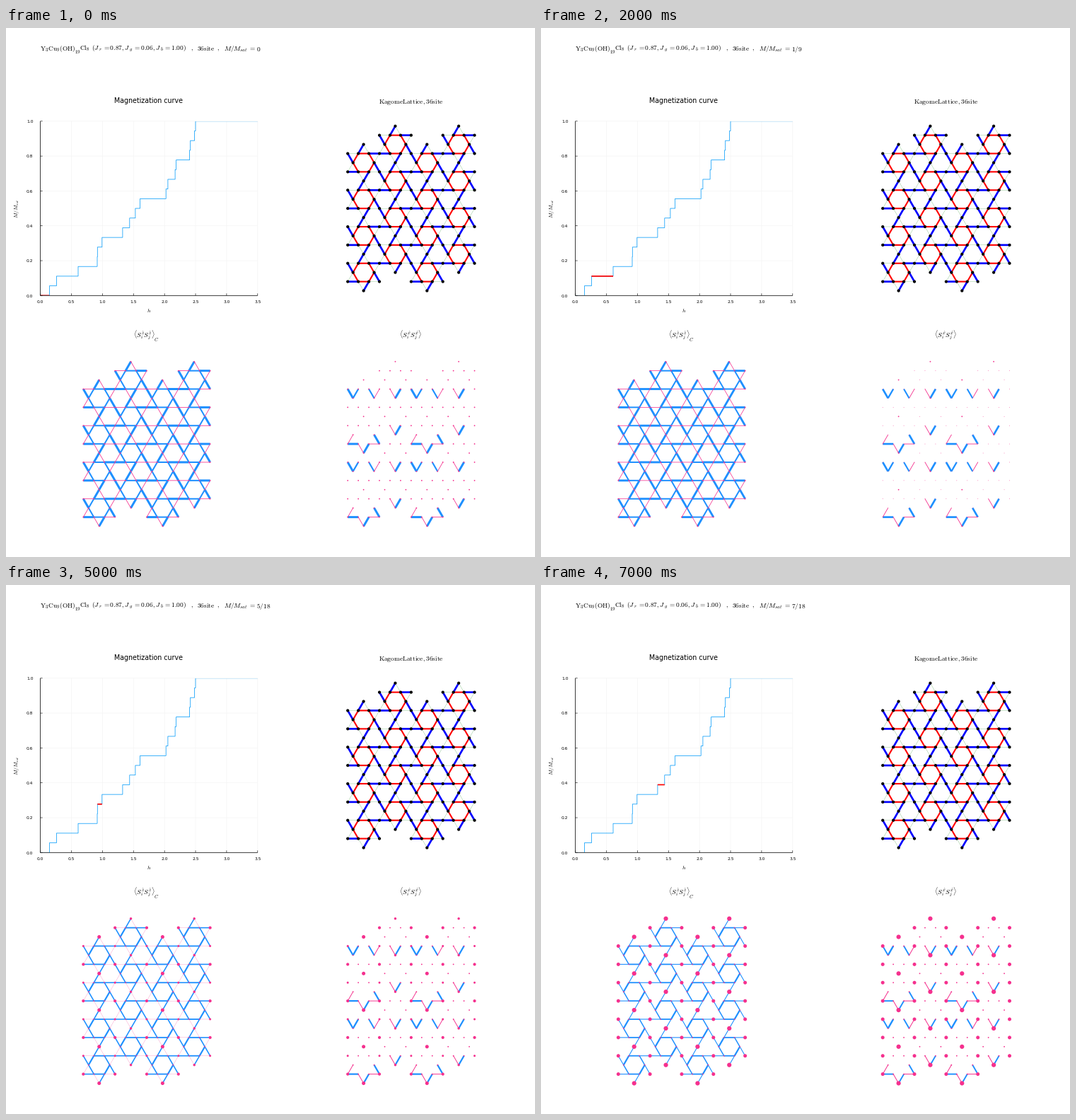
A matplotlib script for the animation above (8 s loop, 748 by 748 pixels).

```python
import math

import matplotlib.pyplot as plt
import numpy as np
from matplotlib.animation import FuncAnimation
from matplotlib.collections import LineCollection
from matplotlib.patches import Rectangle

SIZE, DPI, STATES = 748, 64, 8
PT = 72 / DPI  # points per pixel
BLUE, PINK = "#1e90ff", "#f5308e"

plt.rcParams["mathtext.fontset"] = "cm"
plt.rcParams["font.family"] = "DejaVu Sans"

fig = plt.figure(figsize=(SIZE / DPI, SIZE / DPI), dpi=DPI, facecolor="white")
ax = fig.add_axes([0, 0, 1, 1])
ax.set(xlim=(0, SIZE), ylim=(SIZE, 0))
ax.axis("off")


def label(x, y, s, px=9.4, ha="left", va="baseline", **kw):
    return ax.text(x, y, s, fontsize=px * PT, ha=ha, va=va, **kw)


def line(xs, ys, color, px, **kw):
    return ax.plot(xs, ys, color=color, lw=px * PT, snap=False,
                   solid_capstyle="butt", solid_joinstyle="miter", **kw)[0]


# --- heading -------------------------------------------------------------
for x, part in [(48.5, r"\mathrm{Y_3Cu_9(OH)}"), (104.5, r"\mathrm{Cl_8}"),
                (121, r"(J_{\;r}\,=0.87,J_{\;g}\,=0.06,J_{\;b}\,=1.00)"),
                (261, ","), (270, r"\mathrm{36site}"), (298, ","),
                (308, "M/M_{sat}"), (342.7, "=")]:
    label(x, 31.5, f"${part}$")
label(97.5, 36, r"$\mathrm{19}$", 6.6)
value = label(354.5, 33, "")

# --- magnetization curve -------------------------------------------------
X0, X1, Y0, Y1 = 48.6, 355.8, 378.3, 131.8
EDGES = [X0, 61.4, 71.4, 102, 129, 129.3, 135.8, 164.9, 174.8, 182.9, 189.6,
         226.2, 228.9, 239.1, 240.6, 259.6, 260.7, 266.6, 268, X1]


def level(n):
    return Y0 + (Y1 - Y0) * n / 18


for i, x in enumerate(np.linspace(X0, X1, 8)):
    line([x, x], [Y0, Y1], "#f3f3f3", 0.6, zorder=0)
    line([x, x], [Y0, Y0 - 3], "black", 0.6)
    label(x, 389.3, f"{i / 2:.1f}", 6, "center")
for i, y in enumerate(np.linspace(Y0, Y1, 6)):
    line([X0, X1], [y, y], "#f3f3f3", 0.6, zorder=0)
    line([X0, X0 + 3], [y, y], "black", 0.6)
    label(38.5, y + 2.2, f"{i / 5:.1f}", 6, "right")
line([X0, X0, X1], [Y1, Y0, Y0], "black", 0.75)

frame = Rectangle((X0, Y1), X1 - X0, Y0 - Y1, transform=ax.transData)
curve = line(np.repeat(EDGES, 2)[1:-1], np.repeat(level(np.arange(19)), 2),
             "#009afa", 0.75)
plateau = line([], [], "red", 1.7, zorder=4)
for part in (curve, plateau):
    part.set_clip_path(frame)

label(202, 106.2, "Magnetization curve", 9.5, "center")
label(202, 401.5, "$h$", 7.6, "center")
label(15.5, 255, "$M/M_{sat}$", 7.6, "center", "center", rotation=90)

# --- lattice: u counts half bonds across, k counts rows down --------------
RING = [(2, 0), (1, 1), (-1, 1), (-2, 0), (-1, -1), (1, -1)]  # clockwise
SIDES = "/-x"  # directions of hexagon sides


def add(p, q):
    return p[0] + q[0], p[1] + q[1]


def in_cross(center, a, b, kind):
    """Whether the transverse panel shows a bond with rows a, b off center."""
    low, high = sorted((a, b))
    row = center[1] % 8
    if row == 0:
        return kind not in SIDES and b > 0
    if row == 4:
        return (low, high) == (-1, 0)
    return high == 2


sites, bonds, cross = set(), [], []
for k in range(2, 17, 2):
    for u in ((9, 21) if k % 4 == 2 else (3, 15)):
        for i, v in enumerate(RING):
            after, before = RING[(i + 1) % 6], RING[i - 1]
            for end, kind in ((after, SIDES[i % 3]), (add(v, after), "b"),
                              (add(v, before), "g")):
                bond = add((u, k), v), add((u, k), end), kind
                sites.update(bond[:2])
                bonds.append(bond)
                if in_cross((u, k), v[1], end[1], kind):
                    cross.append(bond)
sites = sorted(sites)


class Panel:
    def __init__(self, x, y, links, dot_color):
        def place(p):
            return x + 7.472 * p[0], y + 12.935 * p[1]

        self.kinds = [kind for _, _, kind in links]
        self.lines = LineCollection([[place(a), place(b)] for a, b, _ in links],
                                    capstyle="butt", zorder=2)
        self.lines.set_snap(False)
        ax.add_collection(self.lines)
        self.dots = ax.scatter(*zip(*map(place, sites)), color=dot_color,
                               linewidths=0, zorder=3, snap=False)

    def style(self, widths, colors, radii):
        self.lines.set_linewidths([widths[k] * PT for k in self.kinds])
        self.lines.set_color([colors[k] for k in self.kinds])
        self.dots.set_sizes((2 * PT * np.asarray(radii)) ** 2)


def by_kind(b, rising, flat, falling, g):
    return {"b": b, "/": rising, "-": flat, "x": falling, "g": g}


lattice = Panel(483.2, 138.7, bonds, "black")
lattice.style(by_kind(2.7, 2.1, 2.1, 2.1, 0.2),
              by_kind("blue", "red", "red", "red", "green"),
              [2.1] * len(sites))
label(572.5, 106.5, r"$\mathrm{KagomeLattice},\mathrm{36site}$", ha="center")

zz = Panel(109.3, 471.7, bonds, PINK)
xx = Panel(483.2, 471.7, cross, PINK)
label(180, 437.5, r"$\langle S_i^{\hat{z}}S_j^{\hat{z}}\rangle$")
label(209.5, 442.5, "$C$", 6.8)
label(556, 437.5, r"$\langle S_i^{\hat{x}}S_j^{\hat{x}}\rangle$")

# --- states --------------------------------------------------------------
SIGNS = by_kind(BLUE, BLUE, BLUE, BLUE, PINK)


def fraction(n):
    g = math.gcd(n, 18)
    return f"{n // g}/{18 // g}" if n else "0"


def radius(site, n, dip):
    """Dots off the hexagons grow with field, alternate row pairs first."""
    u, k = site
    if u % 3:
        return 0.9 - dip
    early = k % 4 in (1, 2)
    grow = np.interp(n, [3, 4, 7], [0, 0.6 if early else 0.05, 1])
    return 0.9 - dip + 1.6 * grow if k % 2 else 0.9 + 2.2 * grow


def draw(n):
    value.set_text(rf"$\mathrm{{{fraction(n)}}}$")
    plateau.set_data([EDGES[n], EDGES[n + 1]], [level(n)] * 2)

    t = n / (STATES - 1)
    s = np.clip((n - 1) / (STATES - 2), 0, 1)
    s = s * s * (3 - 2 * s)
    zz.style(by_kind(3 - 1.9 * s, 2 + 0.2 * s, 2 - 0.2 * s, 2 - 0.5 * s,
                     0.8 * (1 - s)),
             SIGNS, [radius(p, n, 0) for p in sites])
    dip = 0.5 * max(0, math.sin(math.pi * n / 4))
    xx.style(by_kind(3 - 1.1 * t, 2.2 + 0.2 * t, 2.2, 2.1 - 0.2 * t,
                     0.8 + 0.2 * t),
             SIGNS, [radius(p, n, dip) for p in sites])
    return value, plateau, zz.lines, zz.dots, xx.lines, xx.dots


anim = FuncAnimation(fig, draw, frames=STATES, interval=1000, repeat=True,
                     repeat_delay=0, init_func=lambda: draw(0))
plt.show()
```
